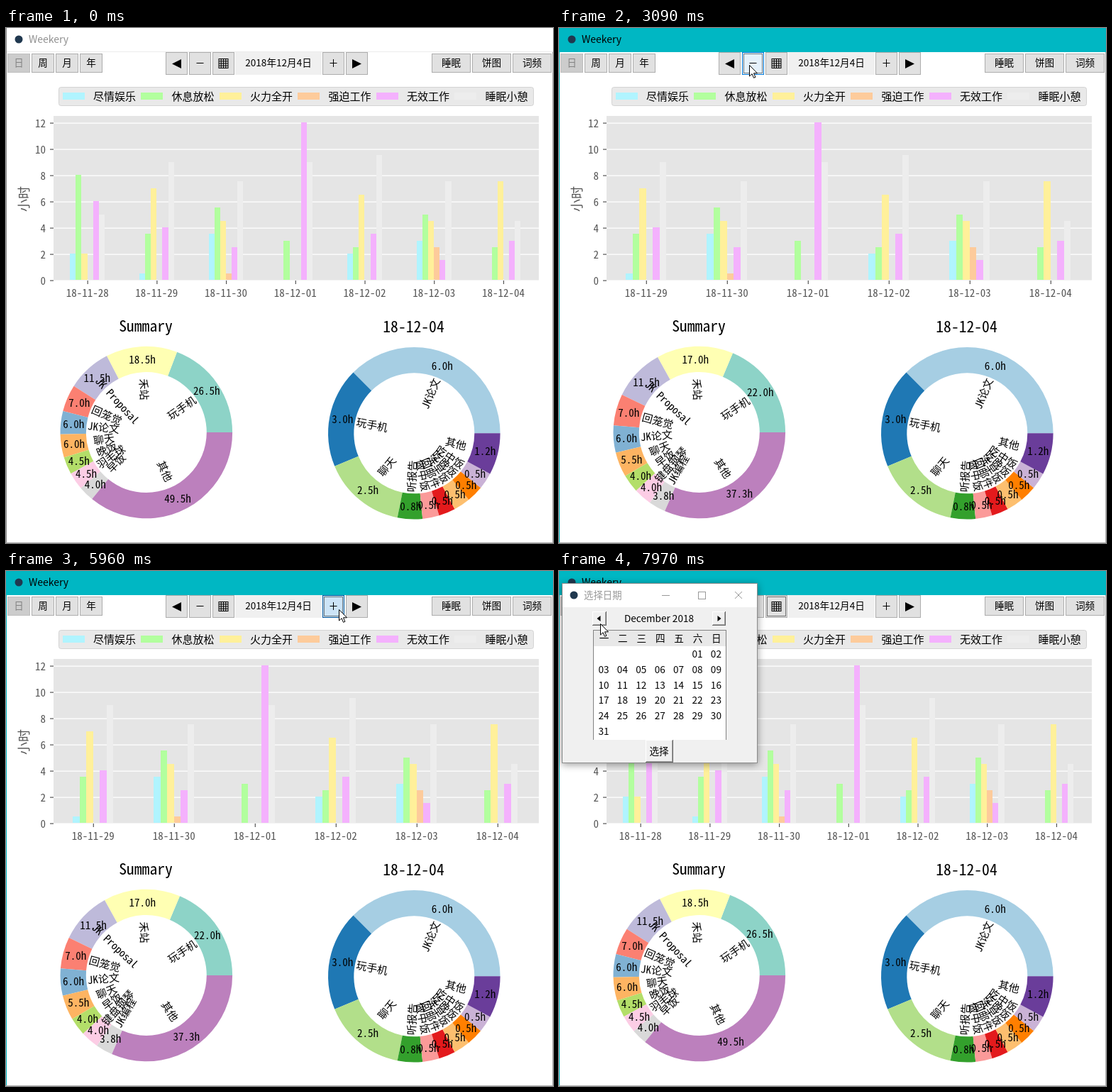
An HTML page with a canvas for the animation above (8 s loop, 771x726 px).

```html
<!DOCTYPE html>
<html lang="zh-CN">
<head>
<meta charset="utf-8">
<title>Weekery</title>
<style>
  html, body { margin: 0; width: 100%; height: 100%; overflow: hidden; background: #fff; }
  canvas { display: block; }
</style>
</head>
<body>
<canvas id="stage" width="771" height="726"></canvas>
<script>
const LOOP = 8000;
const UI = '"Noto Sans CJK SC", "Noto Sans CJK", "Noto Sans", sans-serif';
const PLOT = '"Noto Sans Mono CJK SC", "Noto Sans CJK SC", "Noto Sans CJK", sans-serif';
const stage = document.getElementById('stage').getContext('2d');
let g = stage;

const SERIES = [
  ['尽情娱乐', '#b0f4ff'], ['休息放松', '#b2ff9e'], ['火力全开', '#fff09a'],
  ['强迫工作', '#fdcb9b'], ['无效工作', '#f4b1fd'], ['睡眠小憩', '#ededed']
];
const DAYS = [
  ['18-11-27', [0.5, 9.5, 2, 0, 1.5, 7]],
  ['18-11-28', [2, 8, 2, 0, 6, 5]],
  ['18-11-29', [0.5, 3.5, 7, 0, 4, 9]],
  ['18-11-30', [3.5, 5.5, 4.5, 0.5, 2.5, 7.5]],
  ['18-12-01', [0, 3, 0, 0, 12, 9]],
  ['18-12-02', [2, 2.5, 6.5, 0, 3.5, 9.5]],
  ['18-12-03', [3, 5, 4.5, 2.5, 1.5, 7.5]],
  ['18-12-04', [0, 2.5, 7.5, 0, 3, 4.5]]
];
const PASTEL = ['#8dd3c7', '#ffffb3', '#bebada', '#fb8072', '#80b1d3',
  '#fdb462', '#b3de69', '#fccde5', '#d9d9d9', '#bc80bd'];
const PAIRED = ['#a6cee3', '#1f78b4', '#b2df8a', '#33a02c', '#fb9a99',
  '#e31a1c', '#fdbf6f', '#ff7f00', '#cab2d6', '#6a3d9a'];

const pie = (labels, ...hours) => labels.split(',').map((name, i) => [name, hours[i]]);
const SUMMARY = {
  week4: pie('玩手机,禾站,JK Proposal,回笼觉,JK论文,聊天,晚饭,羽毛球,早饭,其他',
    26.5, 18.5, 11.5, 7, 6, 6, 4.5, 4.5, 4, 49.5),
  week3: pie('玩手机,禾站,JK Proposal,回笼觉,晚饭,早饭,羽毛球,飞机上,时差,其他',
    25, 18.5, 11.5, 7, 5, 4.5, 4.5, 4.5, 4.5, 57.5),
  six: pie('玩手机,禾站,JK Proposal,回笼觉,JK论文,聊天,早饭,键盘钢琴,JK编程,其他',
    22, 17, 11.5, 7, 6, 5.5, 4, 4, 3.75, 37.25),
  five: pie('玩手机,禾站,回笼觉,JK Proposal,JK论文,聊天,早饭,键盘钢琴,JK编程,其他',
    18.5, 16.5, 7, 6.5, 6, 5, 4, 4, 3.749, 31.25)
};
const DAY_PIE = {
  4: pie('JK论文,玩手机,聊天,听报告,做中饭,回邮件,洗早饭,吃晚饭,吃中饭,其他',
    6, 3, 2.5, 0.75, 0.5, 0.5, 0.5, 0.5, 0.5, 1.249),
  3: pie('JK编程,购物,键盘钢琴,弄禾行,玩手机,聊天,领钥匙,禾站,收拾,其他',
    3.75, 2, 2, 1.5, 1.5, 1.5, 1, 1, 0.5, 2.75)
};

const START = {
  active: false, date: 4, last: 7, count: 7, summary: 'week4', day: 4,
  over: '', down: false, focus: '', cursor: null, alpha: 0, scale: 1
};
const at = (x, y, more) => ({ cursor: [x, y], ...more });
const press = focus => ({ down: true, focus });
// Each entry changes part of the state from its time on.
const EVENTS = [
  [70, at(240, 49, { over: 'prev' })], [160, { down: true }],
  [310, { active: true, focus: 'prev' }],
  [550, { last: 6, down: false }], [700, { summary: 'week3' }], [790, { day: 3, date: 3 }],
  [1250, at(258, 48, { over: 'minus' })], [1330, at(325, 50, { over: '' })],
  [1410, at(425, 53)], [1490, at(492, 52, { over: 'next' })], [1560, press('next')],
  [1710, { last: 7, down: false }], [1880, { summary: 'week4', day: 4, date: 4 }],
  [2490, at(466, 54, { over: 'plus' })], [2570, at(380, 56, { over: '' })],
  [2640, at(296, 54, { over: 'cal' })], [2720, at(268, 52, { over: 'minus' })], [2790, press('minus')],
  [2940, { count: 6, down: false }], [3090, { summary: 'six' }],
  [3570, { down: true }], [3780, { count: 5, down: false }], [3940, { summary: 'five' }],
  [4640, at(280, 55)], [4720, at(330, 60, { over: '' })], [4800, at(390, 63)],
  [4880, at(440, 60)], [4950, at(464, 56, { over: 'plus' })], [5030, at(469, 54)],
  [5180, press('plus')], [5410, { count: 6, down: false }], [5560, { summary: 'six' }],
  [5880, { down: true }], [6110, { count: 7, down: false }], [6260, { summary: 'week4' }],
  [6660, at(440, 55, { over: '' })], [6740, at(378, 56)],
  [6820, at(326, 55)], [6890, at(311, 53, { over: 'cal' })],
  [7040, press('cal')], [7200, { down: false }],
  [7360, { alpha: 0.5, scale: 0.974 }], [7440, { alpha: 0.88, scale: 0.993 }],
  [7520, { alpha: 1, scale: 1 }], [7590, at(288, 58, { over: '' })],
  [7670, at(220, 70)], [7740, at(150, 78)], [7820, at(95, 80)],
  [7900, at(66, 76)], [7970, at(58, 74)]
];

function box(x, y, w, h, fill, line) {
  g.fillStyle = fill;
  g.fillRect(x, y, w, h);
  if (line) {
    g.strokeStyle = line;
    g.lineWidth = 1;
    g.strokeRect(x + 0.5, y + 0.5, w - 1, h - 1);
  }
}

// y is the middle of the glyphs.
function text(str, x, y, size = 13.6, { font = UI, color = '#000', align = 'center' } = {}) {
  g.font = `${size}px ${font}`;
  g.fillStyle = color;
  g.textAlign = align;
  g.fillText(str, x, y + size * 0.37);
}
const plotText = (str, x, y, size = 15, color = '#000', align = 'center') =>
  text(str, x, y, size, { font: PLOT, color, align });

function turned(x, y, angle, draw) {
  g.save();
  g.translate(x, y);
  g.rotate(angle);
  draw();
  g.restore();
}

function polygon(points, fill, line) {
  g.beginPath();
  points.forEach(([x, y]) => g.lineTo(x, y));
  g.closePath();
  g.fillStyle = fill;
  g.fill();
  if (line) {
    g.strokeStyle = line;
    g.lineWidth = 1;
    g.stroke();
  }
}
const arrow = (x, y, w, h) => polygon([[x - w / 2, y], [x + w / 2, y - h], [x + w / 2, y + h]], '#000');

function dot(x, y) {
  g.beginPath();
  g.arc(x, y, 5.5, 0, 7);
  g.fillStyle = '#20384f';
  g.fill();
}

const ICONS = {
  prev: x => arrow(x, 50.5, 13, 6.5),
  minus: x => box(x - 5, 49, 10, 1, '#000'),
  cal: x => {
    box(x - 7, 43, 14, 14, '#000');
    for (let i = 0; i < 16; i++) {
      box(x - 6 + (i % 4) * 3.25, 44 + (i >> 2) * 3.25, 2.25, 2.25, '#d4d4d4');
    }
  },
  plus: x => { box(x - 5, 49, 10, 1, '#000'); box(x - 0.5, 44, 1, 11, '#000'); },
  next: x => arrow(x, 50.5, -13, 6.5)
};
const ICON_X = { prev: 225, minus: 258, cal: 291, plus: 446, next: 479 };

function iconButton(name, s) {
  const x = ICON_X[name], over = s.over === name;
  const [fill, line] = over
    ? (s.down ? ['#cce4f7', '#005499'] : ['#e5f1fb', '#0078d7'])
    : ['#e1e1e1', '#adadad'];
  box(x, 34, 31, 32, fill, line);
  if (s.focus === name) {
    g.setLineDash([1, 1]);
    g.strokeStyle = '#000';
    g.strokeRect(x + 2.5, 36.5, 26, 27);
    g.setLineDash([]);
  }
  ICONS[name](x + 15.5);
}

function drawWindow(s) {
  box(0, 0, 771, 726, '#fff');
  if (s.active) box(0, 0, 771, 34, '#00b7c3');
  else box(0, 33, 771, 1, '#ebebeb');
  box(0, 0, 1, 726, s.active ? '#00b7c3' : '#8a8a8a');
  box(770, 34, 1, 692, '#b4b4b4');
  box(0, 725, 771, 1, '#b4b4b4');
  dot(18, 16);
  text('Weekery', 32, 16, 14, { align: 'left', color: s.active ? '#000' : '#909090' });

  [...'日周月年'].forEach((label, i) => {
    const x = 2 + i * 34;
    box(x, 36, 32, 27, i ? '#e1e1e1' : '#cccccc', i ? '#adadad' : '#bfbfbf');
    text(label, x + 16, 49, 13.6, { color: i ? '#000' : '#838383' });
  });
  ['睡眠', '饼图', '词频'].forEach((label, i) => {
    box(600 + i * 57, 36, 55, 27, '#e1e1e1', '#adadad');
    text(label, 627.5 + i * 57, 49);
  });
  box(323, 34, 122, 32, '#f0f0f0');
  text(`2018年12月${s.date}日`, 384, 49);
  Object.keys(ICONS).forEach(name => iconButton(name, s));
}

function drawLegend() {
  g.beginPath();
  g.roundRect(74.5, 83.5, 669, 26, 3);
  g.fillStyle = '#e9e9e9';
  g.fill();
  g.strokeStyle = '#d3d3d3';
  g.lineWidth = 1;
  g.stroke();
  SERIES.forEach(([name, color], i) => {
    const x = 80 + i * 110.5;
    box(Math.floor(x), 91, 31, 10, color);
    plotText(name, x + 43, 96, 15, '#000', 'left');
  });
}

function drawBars(s) {
  const base = 355.5, unit = 18.5, left = 66.2, step = 684 / s.count, width = step / 12;
  box(67, 124, 684, 232, '#e5e5e5');
  for (let h = 0; h <= 12; h += 2) {
    const y = Math.round(base - h * unit);
    box(67, y - 0.5, 684, 1.3, '#fff');
    box(62, y - 0.5, 5, 1.2, '#555');
    plotText(h, 56, y, 15, '#555', 'right');
  }
  turned(25, 241, -Math.PI / 2, () => plotText('小时', 0, 0, 18, '#555'));
  DAYS.slice(s.last + 1 - s.count, s.last + 1).forEach(([label, hours], i) => {
    const mid = left + (i + 0.5) * step;
    const edge = k => Math.floor(mid - step / 4 + k * width);
    hours.forEach((h, k) => {
      const top = Math.floor(base - h * unit);
      box(edge(k), top, edge(k + 1) - edge(k), Math.floor(base) - top, SERIES[k][1]);
    });
    box(mid - 0.5, 356, 1.2, 5, '#555');
    plotText(label, mid - 0.4, 373, 15, '#555');
  });
}

function drawRing(cx, cy, slices, colors) {
  const total = slices.reduce((sum, [, h]) => sum + h, 0), R = 121.3;
  const parts = [];
  let from = 0;
  slices.forEach(([name, h], i) => {
    const to = from + h / total * 2 * Math.PI;
    g.beginPath();
    g.arc(cx, cy, R, -from, -to, true);
    g.arc(cx, cy, 85, -to, -from);
    g.closePath();
    g.fillStyle = colors[i];
    g.fill();
    parts.push([name, h, (from + to) / 2]);
    from = to;
  });
  parts.forEach(([name, h, mid]) => {
    const dx = Math.cos(mid), dy = -Math.sin(mid);
    turned(cx + dx * R / 2, cy + dy * R / 2, dx > 0 ? -mid : Math.PI - mid,
      () => plotText(name, 0, 0));
    plotText(h.toFixed(1) + 'h', cx + dx * R * 0.85, cy + dy * R * 0.85);
  });
}

function drawPies(s) {
  plotText('Summary', 197, 420.5, 21.6);
  plotText('18-12-0' + s.day, 574.5, 421, 21.6);
  drawRing(197.8, 570, SUMMARY[s.summary], PASTEL);
  if (s.day === 4) drawRing(575.3, 571.3, DAY_PIE[4], PAIRED);
  else drawRing(574.5, 570.5, DAY_PIE[3], PAIRED);
}

function raised(x, y, w, h) {
  box(x, y, w, h, '#696969');
  box(x, y, w - 1, h - 1, '#fff');
  box(x + 1, y + 1, w - 2, h - 2, '#a0a0a0');
  box(x + 1, y + 1, w - 3, h - 3, '#f0f0f0');
}

function drawDialog() {
  g.save();
  g.shadowColor = 'rgba(0,0,0,.4)';
  g.shadowBlur = 10;
  g.shadowOffsetY = 2;
  box(4, 17, 276, 254, '#f0f0f0');
  g.restore();
  box(4, 17, 276, 254, '#f0f0f0', '#8c8c8c');
  box(5, 18, 274, 33, '#fff');
  dot(21, 34);
  text('选择日期', 35, 34, 13.4, { align: 'left', color: '#999' });
  box(145, 34, 11, 1, '#999');
  box(196, 29, 11, 11, '#fff', '#999');
  g.beginPath();
  g.moveTo(248, 29); g.lineTo(258, 39);
  g.moveTo(258, 29); g.lineTo(248, 39);
  g.stroke();

  raised(47, 57, 20, 20);
  arrow(56, 67, 5, 4);
  raised(216, 57, 19, 20);
  arrow(226, 67, -5, 4);
  text('December 2018', 141, 67);

  box(48, 83, 188, 155, '#828282');
  box(49, 84, 186, 22, '#e8e8e8');
  box(49, 106, 186, 132, '#fff');
  const colX = c => 63 + c * 26.4;
  [...'一二三四五六日'].forEach((d, c) => text(d, colX(c) + 0.5, 95));
  for (let d = 1; d <= 31; d++) {
    const cell = d + 4;
    text(String(d).padStart(2, '0'), colX(cell % 7), 117 + Math.floor(cell / 7) * 21.8);
  }
  raised(122, 238, 39, 32);
  text('选择', 141, 254);
}

const dialog = document.createElement('canvas');
dialog.width = 340;
dialog.height = 300;

function paintDialog(s) {
  g = dialog.getContext('2d');
  g.clearRect(0, 0, dialog.width, dialog.height);
  drawDialog();
  g = stage;
  g.save();
  g.globalAlpha = s.alpha;
  g.translate(85, 144);
  g.scale(s.scale, s.scale);
  g.drawImage(dialog, -85, -144);
  g.restore();
}

function drawCursor([x, y]) {
  const shape = [[0, 0], [0, 15.5], [3.6, 12.2], [6, 17.8], [8.4, 16.8], [6, 11.3], [11, 11.3]];
  polygon(shape.map(([dx, dy]) => [x + 0.5 + dx, y + 0.5 + dy]), '#fff', '#000');
}

function render(t) {
  const s = Object.assign({}, START, ...EVENTS.filter(e => e[0] <= t).map(e => e[1]));
  drawWindow(s);
  drawLegend();
  drawBars(s);
  drawPies(s);
  if (s.alpha) paintDialog(s);
  if (s.cursor) drawCursor(s.cursor);
}

const begin = performance.now();
function tick() {
  render((performance.now() - begin) % LOOP);
  requestAnimationFrame(tick);
}
tick();
</script>
</body>
</html>
```
